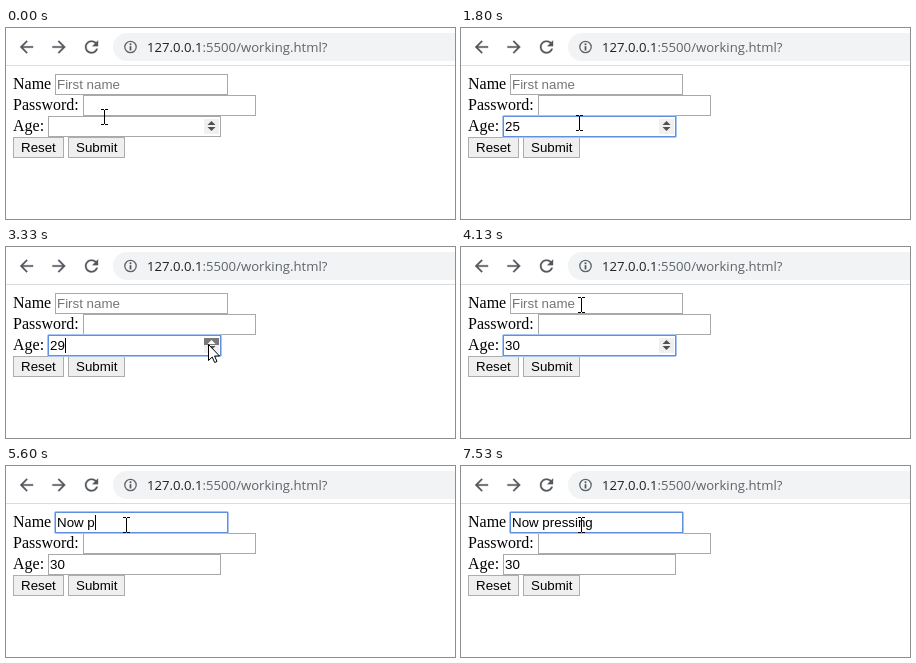
Animation of 449x191 px, one loop 8000 ms. Source, as an HTML page:

```html
<!DOCTYPE html>
<html lang="en">
<head>
<meta charset="utf-8">
<title>Form demo</title>
<style>
  html, body { margin: 0; width: 100%; height: 100%; overflow: hidden; background: #fff; }
  svg { display: block; }
  text { white-space: pre; }
  .label { font: 16px "Liberation Serif", "Times New Roman", serif; }
  .field { font: 13.333px "Liberation Sans", Arial, sans-serif; }
  .url { font: 13.15px "Open Sans", sans-serif; fill: #5f6368; }
  .box { fill: #fff; stroke: #a9a9a9; }
  .button { fill: #efefef; stroke: #adadad; }
  .ring { fill: none; }
  .icon { fill: #54585d; stroke: #54585d; stroke-width: .3; }
</style>
</head>
<body>
<svg width="449" height="191" viewBox="0 0 449 191">
  <defs>
    <path id="back" d="M20 11H7.83l5.59-5.59L12 4l-8 8 8 8 1.41-1.41L7.83 13H20z"/>
  </defs>

  <!-- Browser toolbar -->
  <rect y="37" width="449" height="1" fill="#dadce0"/>
  <rect x="107" y="5" width="400" height="28" rx="14" fill="#f1f3f4"/>
  <g class="icon">
    <use href="#back" transform="translate(20.5 19) scale(.82) translate(-12 -12)"/>
    <use href="#back" transform="translate(53 19) scale(-.82 .82) translate(-12 -12)"/>
    <path transform="translate(85.5 19) scale(.82) translate(-12 -12)"
      d="M17.65 6.35C16.2 4.9 14.21 4 12 4c-4.42 0-7.99 3.58-7.99 8s3.57 8 7.99 8c3.73 0 6.84-2.55 7.73-6h-2.08c-.82 2.33-3.04 4-5.65 4-3.31 0-6-2.69-6-6s2.69-6 6-6c1.66 0 3.14.69 4.22 1.78L13 11h7V4z"/>
    <path d="M123.8 18.3h1.4v4h-1.4zM123.8 15.6h1.4v1.4h-1.4z"/>
  </g>
  <circle cx="124.5" cy="19" r="5.7" fill="none" stroke="#5f6368" stroke-width="1.3"/>
  <text class="url" x="141" y="24"><tspan fill="#202124">127.0.0.1</tspan>:5500/working.html?</text>

  <!-- Form -->
  <g class="label">
    <text x="7" y="61">Name</text>
    <text x="7" y="82">Password:</text>
    <text x="7" y="103">Age:</text>
  </g>
  <rect class="box" x="49.5" y="46.5" width="172" height="20"/>
  <rect class="box" x="77.5" y="67.5" width="172" height="20"/>
  <rect class="box" x="42.5" y="88.5" width="172" height="20"/>
  <rect class="button" x="7.5" y="109.5" width="50" height="20"/>
  <rect class="button" x="62.5" y="109.5" width="56" height="20"/>
  <g class="field">
    <text x="15" y="124">Reset</text>
    <text x="70" y="124">Submit</text>
    <text id="hint" x="51" y="61" fill="#757575">First name</text>
    <text id="name" x="51" y="61"></text>
    <text id="age" x="44" y="103"></text>
  </g>
  <g id="spinner">
    <rect x="198" y="91" width="15" height="15" fill="#f0f0f0"/>
    <rect id="half" x="198" width="15" height="7"/>
    <path id="up" d="M201.5 97L205.5 93L209.5 97Z"/>
    <path d="M201.5 99L205.5 103L209.5 99Z" fill="#505050"/>
  </g>
  <g id="ring" class="ring">
    <rect x="-.5" y="-.5" width="174" height="22" rx="1.5" stroke="#a9c5f4"/>
    <rect x=".5" y=".5" width="172" height="20" stroke="#5f8fdd"/>
  </g>
  <rect id="caret" width="1" height="15"/>
  <rect id="list" x="48.5" y="68.5" width="193" height="130" fill="#fff" stroke="#c8c8c8"/>

  <!-- Pointers, placed by their hot spots -->
  <path id="beam" d="M-3 -8h3v1h-3zM1 -8h3v1h-3zM0 -7h1v14h-1zM-3 7h3v1h-3zM1 7h3v1h-3z"/>
  <path id="arrow" d="M.5 .5V16.5L4.2 13L6.7 18.5L9 17.5L6.6 12H11.5Z" fill="#fff" stroke="#000"/>
</svg>
<script>
const LOOP = 8000;
const $ = id => document.getElementById(id);

// Each row: start time, then the state held until the next row.
const pointer = [
  [0, 'beam', 98, 89], [200, 'beam', 99, 90], [270, 'beam', 101, 92],
  [330, 'beam', 102, 93], [400, 'beam', 103, 94],
  [1730, 'beam', 106, 94], [1800, 'beam', 118, 95], [1870, 'beam', 138, 97],
  [1930, 'beam', 160, 98], [2000, 'beam', 183, 100], [2070, 'arrow', 205, 101],
  [2130, 'arrow', 211, 101], [2200, 'arrow', 207, 99], [2270, 'arrow', 203, 97],
  [2400, 'arrow', 202, 97],
  [3670, 'arrow', 201, 95], [3730, 'beam', 194, 90], [3800, 'beam', 180, 82],
  [3870, 'beam', 164, 74], [3930, 'beam', 146, 67], [4000, 'beam', 132, 61],
  [4070, 'beam', 123, 58], [4130, 'beam', 120, 58], [4400, 'beam', 120, 59]
];
const age = [
  [0, ''], [1130, '2'], [1270, '25'], [2530, '26'], [2670, '27'],
  [3130, '28'], [3330, '29'], [3470, '30']
];
const name = [
  [0, ''], [5070, 'N'], [5200, 'No'], [5330, 'Now'], [5470, 'Now '],
  [5600, 'Now p'], [5670, 'Now pe'], [5800, 'Now per'], [6130, 'Now pe'],
  [6270, 'Now p'], [6330, 'Now pr'], [6400, 'Now pre'], [6600, 'Now pres'],
  [6670, 'Now press'], [6730, 'Now pressi'], [6800, 'Now pressin'],
  [6930, 'Now pressing'], [7000, 'Now pressing ']
];
const focus = [[0, ''], [930, 'age'], [4200, 'name']];
const caretOff = [[1800, 2330], [4000, 4200], [4670, 5070], [7530, LOOP]];
const presses = [[2530, 2600], [2670, 2800], [3130, 3200], [3330, 3400], [3470, 3530]];
const fields = { age: { x: 42, y: 88 }, name: { x: 49, y: 46 } };

const at = (rows, t) => rows.findLast(row => row[0] <= t).slice(1);
const within = (spans, t) => spans.some(([a, b]) => t >= a && t < b);
const show = (id, on) => $(id).setAttribute('display', on ? 'inline' : 'none');
const set = (id, attrs) => {
  for (const key in attrs) $(id).setAttribute(key, attrs[key]);
};
const move = (id, x, y) => set(id, { transform: `translate(${x} ${y})` });

const pen = document.createElement('canvas').getContext('2d');
pen.font = '13.333px "Liberation Sans", Arial, sans-serif';

function drawFocus(t, active, values) {
  show('ring', active);
  show('caret', active && !within(caretOff, t));
  if (!active) return;
  const { x, y } = fields[active];
  const end = x + 2 + pen.measureText(values[active]).width;
  move('ring', x, y);
  move('caret', Math.round(end), y + 3);
}

function drawSpinner(t, active, kind, x, y) {
  const pressed = within(presses, t);
  const hover = kind === 'arrow' && x >= 198 && x < 213;
  show('spinner', active === 'age' || (!active && y >= 88));
  show('half', hover);
  set('half', { y: y < 99 ? 91 : 99, fill: pressed ? '#787878' : '#c8c8c8' });
  set('up', { fill: pressed ? '#fff' : '#505050' });
}

function draw(t) {
  const [active] = at(focus, t);
  const [kind, x, y] = at(pointer, t);
  const values = { age: at(age, t)[0], name: at(name, t)[0] };

  $('age').textContent = values.age;
  $('name').textContent = values.name;
  show('hint', !values.name);
  show('list', t >= 4200 && t < 5130);
  drawFocus(t, active, values);
  drawSpinner(t, active, kind, x, y);

  for (const id of ['beam', 'arrow']) show(id, id === kind);
  move(kind, x, y);
}

const start = performance.now();
function tick() {
  draw((performance.now() - start) % LOOP);
  requestAnimationFrame(tick);
}
tick();
</script>
</body>
</html>
```
